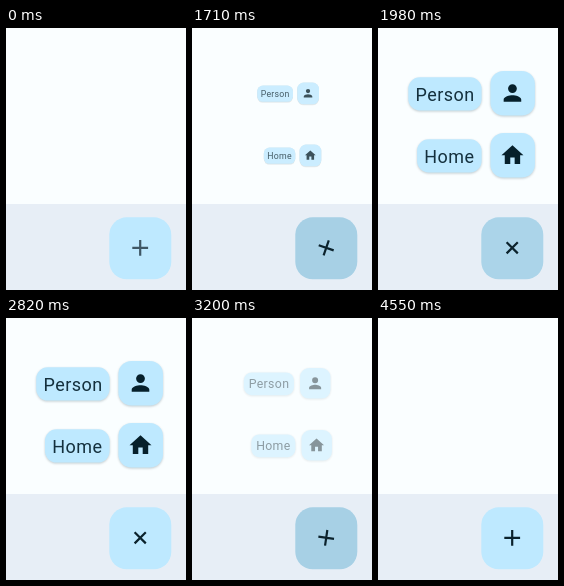
These frames come from a looping animation (180x262 px, 4.63 s). An HTML page:

```html
<!DOCTYPE html>
<html lang="en">
<head>
<meta charset="utf-8">
<title>Expanding action button</title>
<style>
  html, body { margin: 0; width: 100%; height: 100%; overflow: hidden; background: #fafeff; }
  svg { display: block; width: 180px; height: 262px; }
  text { font: 400 18px Roboto, sans-serif; letter-spacing: .5px; fill: #14303d; }
  .chip { fill: #bee9ff; filter: drop-shadow(0 1.2px 1.2px rgba(0, 30, 45, .22)); }
  .icon { fill: #06202b; }
</style>
</head>
<body>
<svg viewBox="0 0 180 262">
  <defs>
    <clipPath id="fabShape"><rect x="103.3" y="189.3" width="62" height="62" rx="17.5"/></clipPath>
  </defs>
  <rect width="180" height="262" fill="#fafeff"/>
  <rect y="176" width="180" height="86" fill="#e7eef6"/>

  <g class="row" data-pivot="98.5 65.5">
    <rect class="chip" x="30.2" y="49.3" width="73.4" height="33.2" rx="11.5"/>
    <rect class="chip" x="112.4" y="43" width="44.6" height="44.6" rx="13"/>
    <text x="37.4" y="72.8">Person</text>
    <path class="icon" transform="translate(134.5 65) scale(1.1) translate(-12 -12)"
      d="M12 12a4 4 0 1 0 0-8 4 4 0 0 0 0 8zm0 2c-2.7 0-8 1.3-8 4v2h16v-2c0-2.7-5.3-4-8-4z"/>
  </g>

  <g class="row" data-pivot="103 127.5">
    <rect class="chip" x="39" y="111.3" width="64.6" height="33.2" rx="11.5"/>
    <rect class="chip" x="112.4" y="105" width="44.6" height="44.6" rx="13"/>
    <text x="46.2" y="134.8">Home</text>
    <path class="icon" transform="translate(134.5 127.2) scale(1.1) translate(-12 -12)"
      d="M10 20v-6h4v6h5v-8h3L12 3 2 12h3v8z"/>
  </g>

  <g clip-path="url(#fabShape)">
    <rect x="103" y="189" width="63" height="63" fill="#bee9ff"/>
    <circle id="ripple" cx="134.3" cy="220.3" fill="#001f2a"/>
  </g>
  <path id="plus" d="M-7.9 0H7.9M0-7.9V7.9" fill="none" stroke-width="2.2"/>
</svg>
<script>
  const LOOP = 4630;
  const OPEN_PRESS = 1330, CLOSE_PRESS = 2820;
  const OPEN = 1575, CLOSE = 3115;
  const rows = [...document.querySelectorAll('.row')];
  const ripple = document.getElementById('ripple');
  const plus = document.getElementById('plus');

  const progress = (t, start, length) => Math.min(1, Math.max(0, (t - start) / length));
  const easeOut = u => Math.sin(u * Math.PI / 2);

  // Rises to 1 after opening and falls back to 0 after closing.
  const toggle = (t, open, close, length) =>
    easeOut(progress(t, open, length)) - easeOut(progress(t, close, length));

  function drawRows(t) {
    const scale = toggle(t, OPEN, CLOSE, 420);
    const alpha = toggle(t, OPEN, CLOSE, 240);
    for (const row of rows) {
      const pivot = row.dataset.pivot;
      const back = pivot.split(' ').map(n => -n).join(' ');
      row.setAttribute('transform', `translate(${pivot}) scale(${scale}) translate(${back})`);
      row.setAttribute('opacity', alpha);
      row.style.display = alpha > 0 ? '' : 'none';
    }
  }

  function drawButton(t) {
    const pressed = t - (t < CLOSE_PRESS ? OPEN_PRESS : CLOSE_PRESS);
    const shade = progress(pressed, 0, 90) - progress(pressed, 575, 520);
    ripple.setAttribute('r', 8 + 38 * progress(pressed, 0, 330));
    ripple.setAttribute('opacity', .12 * shade);

    const angle = 45 * toggle(t, OPEN + 30, CLOSE - 145, 380);
    plus.setAttribute('transform', `translate(134.2 219.8) rotate(${angle})`);
    plus.setAttribute('stroke', t < OPEN_PRESS + 70 ? '#3f5765' : '#0b222c');
  }

  const start = performance.now();
  function tick() {
    const t = (performance.now() - start) % LOOP;
    drawRows(t);
    drawButton(t);
    requestAnimationFrame(tick);
  }
  tick();
</script>
</body>
</html>
```
